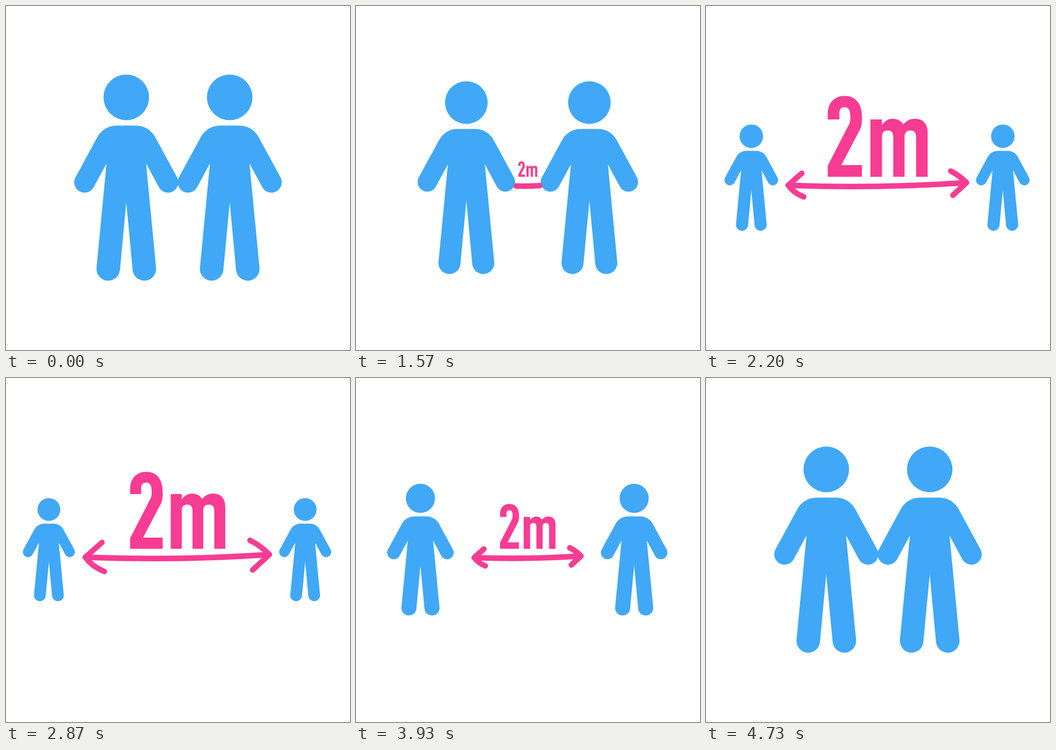
These frames come from a looping animation (640 px wide and 640 px high, 4830 ms). An HTML page with a canvas:

```html
<!DOCTYPE html>
<html lang="en">
<head>
<meta charset="utf-8">
<title>Keep 2m apart</title>
<style>
  html, body { margin: 0; height: 100%; overflow: hidden; background: #fff; }
  canvas { display: block; }
</style>
</head>
<body>
<canvas id="stage" width="640" height="640" role="img" aria-label="2m"></canvas>
<script>
const ctx = document.getElementById('stage').getContext('2d');
const BLUE = '#40a8f6', PINK = '#f73c93';
const LOOP = 4830, ARROW_IN = 1230;

// Right half of a body, relative to the middle of the figure
const halfBody = new Path2D(`M-1-96.8H18C33-96.8 47-88.5 54-75L94.5-.5
  A19.2 19.2 0 0 1 60.7 17.9L36.8-26.3L55.4 167.7
  A21.9 21.9 0 0 1 11.8 171.9L0 46L-1 36Z`);

// Condensed lettering, relative to the middle of the baseline
const two = 'M231 216V206C231 187 243 174.5 261 174.5C281 174.5 291.5 189 291.5 212' +
  'C291.5 225 291 229 286 238L255 297H291.5V317.7H231V298L267 228' +
  'C271 221 271 218 271 211C271 200 268 194.5 261 194.5C254 194.5 251.5 199 251.5 205V216Z';
const em = 'M306.5 216H327V226C332 219 338 215 346 215C354 215 361 218.5 365 225' +
  'C370 218.5 377 215 385 215C399 215 408 223 408 240V317.7H387.5V247' +
  'C387.5 239 384 235.5 377.5 235.5C371 235.5 367 239 367 247V317.7H347V247' +
  'C347 239 343.5 235.5 337 235.5C330.5 235.5 327 239 327 247V317.7H306.5Z';
const label = new Path2D(two + em);

const mix = (a, b, p) => a + (b - a) * p;
const progress = (t, start, length) => Math.min(1, Math.max(0, (t - start) / length));
const inOut = x => x < .5 ? 4 * x ** 3 : 1 - 4 * (1 - x) ** 3;
const ease = (t, start, length) => inOut(progress(t, start, length));

// Accelerates to full size, then rings like a spring
function popIn(t) {
  const ring = t - 2070;
  if (ring < 0) return progress(t, 1170, 900) ** 2;
  return 1 + .12 * Math.exp(-.00234 * ring) * Math.sin(ring / 314 * 2 * Math.PI);
}

function drawFigure(x, size) {
  ctx.fillStyle = BLUE;
  for (const side of [1, -1]) {
    ctx.setTransform(side * size, 0, 0, size, x, 319.3);
    ctx.fill(halfBody);
  }
  ctx.beginPath();
  ctx.arc(0, -149.3, 42.4, 0, 2 * Math.PI);
  ctx.fill();
}

// The shape scales but its line weight does not
function drawArrow(size, headSize) {
  const head = (x, y, upper, lower) => {
    const at = ([dx, dy]) => [x + dx * headSize, y + dy * headSize];
    ctx.moveTo(...at(upper[0]));
    ctx.quadraticCurveTo(...at(upper[1]), x, y);
    ctx.quadraticCurveTo(...at(lower[1]), ...at(lower[0]));
  };
  ctx.setTransform(size, 0, 0, size, 320, 335);
  ctx.beginPath();
  ctx.moveTo(-172.5, -1.5);
  ctx.quadraticCurveTo(0, 5.1, 170, -6.5);
  head(-172.5, -1.5, [[31, -27.5], [15.5, -13.8]], [[35.5, 26.5], [12.5, 17.5]]);
  head(170, -6.5, [[-36, -26.5], [-16, -16.5]], [[-31, 28.5], [-15.5, 14.2]]);
  ctx.resetTransform();
  ctx.strokeStyle = PINK;
  ctx.lineWidth = 10.3;
  ctx.lineCap = ctx.lineJoin = 'round';
  ctx.stroke();
}

function drawLabel(size) {
  ctx.setTransform(size, 0, 0, size, 319.7, 317.7);
  ctx.translate(-319.7, -317.7);
  ctx.fillStyle = PINK;
  ctx.fill(label);
}

function draw(t) {
  const out = ease(t, 1157, 1303);
  const apart = out - ease(t, 3395, 1303);
  const shrink = 1 - ease(t, 3395, 1136);

  ctx.resetTransform();
  ctx.fillStyle = '#fff';
  ctx.fillRect(0, 0, 640, 640);
  drawFigure(mix(223.8, 79.8, apart), 1 - apart / 2);
  drawFigure(mix(416.2, 556.6, apart), 1 - apart / 2);
  if (t >= ARROW_IN && shrink > 0) {
    drawArrow(out * shrink, ease(t, 1700, 760));
    drawLabel(1.006 * popIn(t) * shrink);
  }
}

function tick() {
  draw(performance.now() % LOOP);
  requestAnimationFrame(tick);
}
tick();
</script>
</body>
</html>
```
